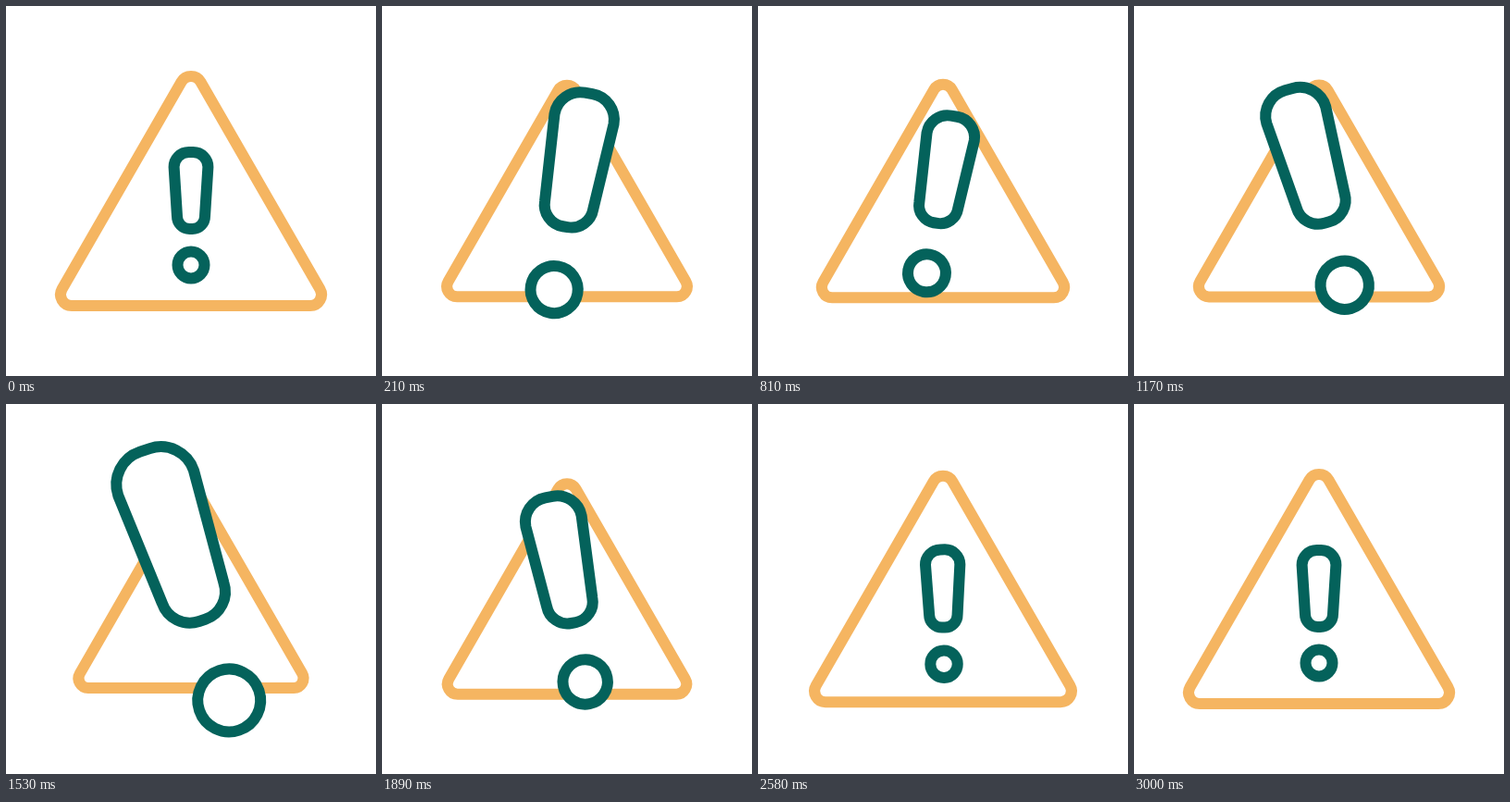
Recreate the animation shown at these times as an HTML page. Size 400 px wide and 400 px high, loop 3030 ms.

```html
<!DOCTYPE html>
<html lang="en">
<head>
<meta charset="utf-8">
<title>Warning</title>
<style>
  html, body { margin: 0; width: 100%; height: 100%; overflow: hidden; background: #fff; }
  svg { display: block; width: 100%; height: 100%; }
</style>
</head>
<body>
<svg viewBox="0 0 400 400">
  <path id="triangle" fill="none" stroke="#f5b561"
    d="M-129 124H129A12 12 0 0 0 139.4 106L10.4 -118A12 12 0 0 0 -10.4 -118L-139.4 106A12 12 0 0 0 -129 124Z"/>
  <g id="mark" fill="#fff" stroke="#04625b">
    <path d="M-2.4 -42H2.4A16 16 0 0 1 18.4 -26L15 27.5A13.5 13.5 0 0 1 1.5 41H-1.5A13.5 13.5 0 0 1 -15 27.5L-18.4 -26A16 16 0 0 1 -2.4 -42Z"/>
    <circle cy="80" r="14.5"/>
  </g>
</svg>
<script>
const LOOP = 3030, STEP = 30, STROKE = 12, CENTER = 200;
const triangle = document.getElementById('triangle');
const mark = document.getElementById('mark');

const ease = u => u < 0.5 ? 4 * u ** 3 : 1 - 4 * (1 - u) ** 3;
const clamp = u => Math.min(1, Math.max(0, u));

function place(node, x, y, angle, scale) {
  node.setAttribute('transform', `translate(${x} ${y}) rotate(${angle}) scale(${scale})`);
  node.setAttribute('stroke-width', STROKE / scale);
}

function draw(time) {
  // Eased progress from 0 to 1 between two moments.
  const move = (from, to) => ease(clamp((time - from) / (to - from)));

  // The mark jumps out, dips while it swings across, then drops back and settles.
  const jump = move(0, 400);
  const dip = move(400, 880) - move(880, 1490);
  const drop = move(1605, 2190);
  const settle = move(2190, 2500);
  const rest = move(2500, 3000);

  const lean = jump - move(400, 980) - move(870, 1413) + move(1500, 2190);
  const tilt = move(0, 410) - 2 * move(410, 1440) + 1.3 * move(1660, 2200) - 0.34 * settle + 0.04 * rest;
  const scale = 1 + 1.34 * jump - 0.94 * dip - 1.45 * drop + 0.125 * settle - 0.015 * rest;
  const y = CENTER - 57 * (jump - drop) + 35 * dip;
  place(mark, CENTER + 18.5 * lean, y, 18.6 * tilt, scale);

  // The triangle shrinks behind the mark, then bursts out later than the mark drops.
  const swell = move(540, 980) - move(980, 1425);
  const burst = move(1710, 2195);
  const size = 1 - 0.138 * jump + 0.088 * swell + 0.266 * burst - 0.143 * settle + 0.015 * rest;
  place(triangle, CENTER, CENTER, 0, size);
}

const start = performance.now();
function tick() {
  const time = (performance.now() - start) % LOOP;
  draw(Math.floor(time / STEP) * STEP);
  requestAnimationFrame(tick);
}
tick();
</script>
</body>
</html>
```
